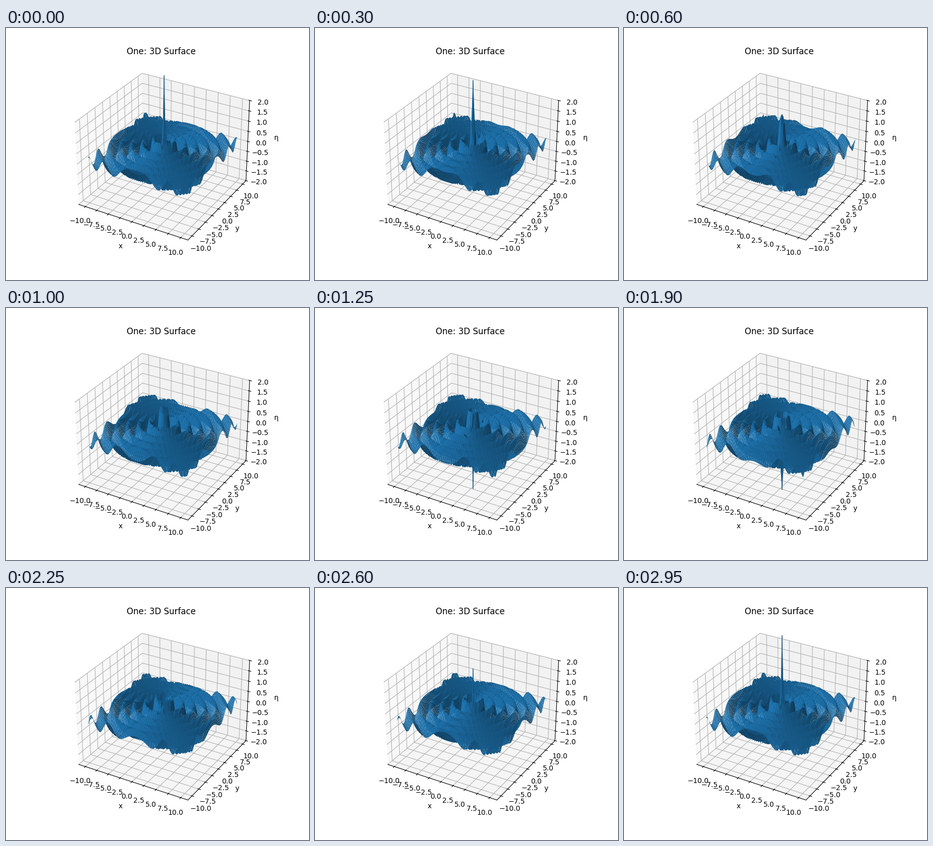
These frames come from a looping animation (600x500 px, 3000 ms). A matplotlib script:

```python
import numpy as np
import matplotlib.pyplot as plt
from matplotlib.animation import FuncAnimation

FRAMES = 60
INTERVAL = 50
WAVE_NUMBER = np.pi

axis = np.linspace(-10, 10, 200)
X, Y = np.meshgrid(axis, axis)
R = np.hypot(X, Y)

fig = plt.figure(figsize=(6, 5), dpi=100)
ax = fig.add_subplot(111, projection="3d")
surface = None


def wave(phase):
    """Circular wave travelling outwards, fading with the square root of distance."""
    return np.cos(WAVE_NUMBER * R - phase) / np.sqrt(R)


def update(frame):
    global surface
    if surface is not None:
        surface.remove()
    # The last frame closes the period, so it repeats the first pose.
    phase = 2 * np.pi * frame / (FRAMES - 1)
    surface = ax.plot_surface(X, Y, wave(phase), color="C0")
    ax.set_zlim(-2, 2)
    return [surface]


ax.set_title("One: 3D Surface")
ax.set_xlabel("x")
ax.set_ylabel("y")
ax.set_zlabel("η")

anim = FuncAnimation(fig, update, frames=FRAMES, interval=INTERVAL,
                     init_func=lambda: update(0), repeat=True, repeat_delay=0)
plt.show()
```
